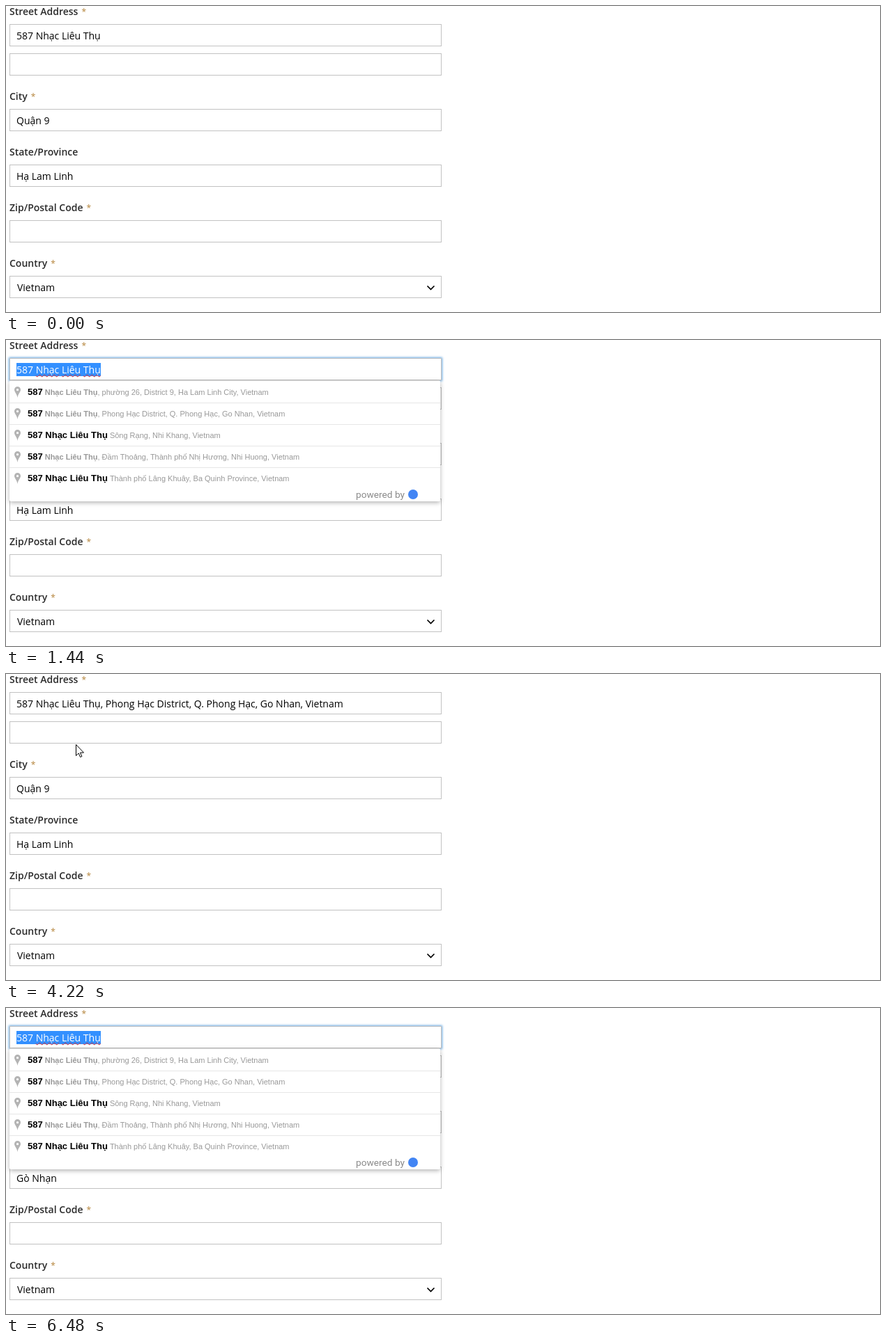
Recreate the animation shown at these times as an HTML page. Size 1254 px wide and 440 px high, loop 8 s.

```html
<!DOCTYPE html>
<html lang="en">
<head>
<meta charset="utf-8">
<title>Address form</title>
<style>
  html, body { margin: 0; width: 1254px; height: 440px; overflow: hidden; background: #fff; }
  body { position: relative; font: 14px/19px "Open Sans", sans-serif; white-space: pre; }
  body > * { position: absolute; }
  .label { left: 5px; color: #2b2b2b; font-weight: 600; }
  .label i { margin-left: 5px; color: #b5853c; font: 12px/1 "Open Sans", sans-serif; }
  .field { left: 5px; width: 618px; height: 30px; border: 1px solid #c2c2c2; }
  .focus { box-shadow: 0 0 3px 1px #68a8e0; }
  .value { left: 15px; color: #000; }
  #sel { left: 15px; top: 33px; color: #fff; background: #3390ff; }
  .spell u { text-decoration: underline wavy #e0262c 1px; text-underline-offset: 1px; text-decoration-skip-ink: none; }
  #sel u { text-decoration-line: none; }
  #sel.spell u { text-decoration-line: underline; }
  #list {
    left: 5px; top: 58px; width: 618px; height: 173px; background: #fff;
    border-top: 1px solid #d9d9d9; border-radius: 2px; box-shadow: 0 2px 6px rgba(0,0,0,.3);
    font: 11px/30px "Liberation Sans", Arial, sans-serif; color: #999;
  }
  .item { position: relative; height: 30px; padding-left: 26px; border-top: 1px solid #e6e6e6; }
  .item:first-child { border-top-color: #fff; }
  .item svg { position: absolute; left: 7px; top: 7px; }
  .item em { padding-right: 3px; color: #000; font: bold 13px/30px "Liberation Sans", Arial, sans-serif; }
  #credit { position: absolute; left: 497px; top: 154px; color: #8a8a8a; font: 13.7px/19px Roboto, sans-serif; }
  #dot { position: absolute; left: 572px; top: 156px; width: 14px; height: 14px; border-radius: 50%; background: #4285f4; }
  #overlay { left: 0; top: 0; }
</style>
</head>
<body>
<script>
const $ = id => document.getElementById(id);
const ROAD = '587 Nhạc Liêu Thụ';
const fieldTops = [26, 68, 148, 228, 308, 388];
const labels = [[-2, 'Street Address', 1], [120, 'City', 1], [200, 'State/Province', 0],
  [280, 'Zip/Postal Code', 1], [360, 'Country', 1]];
const places = [
  [0, 'phường 26, District 9, Ha Lam Linh City'],
  [0, 'Phong Hạc District, Q. Phong Hạc, Go Nhan'],
  [1, 'Sông Rạng, Nhi Khang'],
  [0, 'Đầm Thoảng, Thành phố Nhị Hương, Nhi Huong'],
  [1, 'Thành phố Lâng Khuây, Ba Quinh Province']];

const pin = `<svg width="9" height="16"><path fill="#b3b3b3" fill-rule="evenodd"
  d="M4.5 0a4.5 4.5 0 0 1 4.5 4.5C9 8 5.5 9.500 4.500 16 3.500 9.500 0 8 0 4.500A4.500 4.500 0 0 1 4.500 0zm0 3a1.600 1.600 0 1 0 .01 0z"/></svg>`;
const [number, ...words] = ROAD.split(' ');
const item = ([whole, rest]) => `<div class="item">${pin}<em>${whole ? ROAD : number}</em>` +
  `${whole ? '' : `<b>${words.join(' ')}</b>, `}${rest}, Vietnam</div>`;

document.body.innerHTML =
  labels.map(([y, text, star]) =>
    `<div class="label" style="top:${y}px">${text}${star ? '<i>*</i>' : ''}</div>`).join('') +
  fieldTops.map((y, i) => `<div class="field" id="field${i}" style="top:${y}px"></div>`).join('') +
  `<div class="value" id="street" style="top:33px"></div>
  <div class="value" id="city" style="top:155px"></div>
  <div class="value" id="state" style="top:235px"></div>
  <div class="value" style="top:395px;left:16px">Vietnam</div>
  <div id="sel">${number} ${words.map(w => `<u>${w}</u>`).join(' ')}</div>
  <div id="list">${places.map(item).join('')}<span id="credit">powered by</span><span id="dot"></span></div>
  <svg id="overlay" width="1254" height="440" fill="none" stroke="#000">
    <path d="M604.500 402.500l5 5 5-5" stroke-width="1.700"/>
    <path id="arrow" fill="#fff" d="M.5.5v16l3.700-3.600 2.400 5.600 2.300-1-2.400-5.400h5z"/>
    <path id="beam" d="M-3-7.500H4M.5-7.500V7.500M-3 7.500H4"/>
  </svg>`;

// Pointer moves: start, end, number of steps, first point, last point
const moves = [
  [190, 650, 7, 875, 375, 222, 114],
  [800, 1040, 4, 200, 92, 143, 38],
  [1270, 1355, 2, 110, 38, 50, 38],
  [3380, 3700, 5, 37, 62, 100, 99],
  [3850, 4070, 2, 100, 100, 100, 101],
  [5090, 5870, 11, 101, 99, 153, 41],
  [6010, 6110, 2, 144, 41, 127, 41],
  [6180, 6400, 4, 100, 41, 20, 41]];

function pointer(t) {
  const [t0, t1, n, x0, y0, x1, y1] = moves.findLast(m => t >= m[0]) || moves[0];
  const p = Math.min(1, Math.floor((t - t0) / (t1 - t0) * (n - 1) + 1e-6) / (n - 1));
  const e = p * (1.5 - p / 2);
  return [Math.round(x0 + (x1 - x0) * e), Math.round(y0 + (y1 - y0) * e)];
}

const show = (el, on) => { el.style.visibility = on ? 'visible' : 'hidden'; };
const setText = (id, text) => { if ($(id).textContent !== text) $(id).textContent = text; };

function draw(t) {
  const within = (a, b) => t >= a && t < b;
  const open = within(1440, 4220) || t >= 6480;
  const dragging = within(1270, 1440) || within(6110, 6480);
  const filled = t >= 4470;
  const [x, y] = pointer(t);

  setText('street', within(4220, 4470)
    ? `${ROAD}, ${places[1][1]}, Vietnam` : ROAD);
  setText('city', filled ? 'Q. Phong Hạc' : 'Quận 9');
  setText('state', filled ? 'Gò Nhạn' : 'Hạ Lam Linh');

  $('field0').classList.toggle('focus', within(1270, 4220) || t >= 6010);
  show($('list'), open);
  show($('sel'), open || dragging);
  $('sel').classList.toggle('spell', open);
  $('sel').style.clipPath = dragging ? `inset(0 0 0 ${Math.max(0, x - 15)}px)` : 'none';

  const visible = within(190, 1440) || within(3380, 6480);
  const overField = !open && x >= 5 && x < 625 && fieldTops.some(top => y >= top && y < top + 32);
  for (const [id, on] of [['beam', overField], ['arrow', !overField]]) {
    show($(id), visible && on);
    $(id).setAttribute('transform', `translate(${x} ${y})`);
  }
}

const start = performance.now();
function tick() {
  draw((performance.now() - start) % 8000);
  requestAnimationFrame(tick);
}
tick();
</script>
</body>
</html>
```
